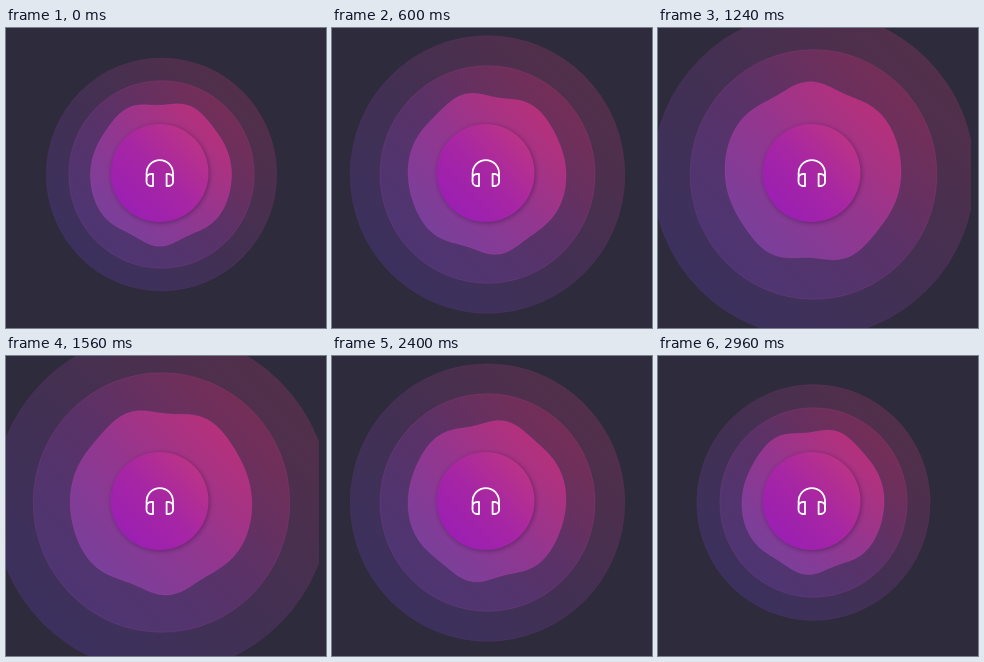
Recreate the animation shown at these times as an HTML page with a canvas. Size 320 by 300 pixels, loop 3 s.

```html
<!DOCTYPE html>
<html>
<head>
<meta charset="utf-8">
<style>
html, body { margin: 0; width: 100%; height: 100%; overflow: hidden; background: #2e2b3d; }
canvas { display: block; }
</style>
</head>
<body>
<canvas id="stage" width="320" height="300"></canvas>
<script>
const ctx = document.getElementById('stage').getContext('2d');
const LOOP = 3000, RIPPLE = 500, TAU = Math.PI * 2;
const cup = 'v12h-2a4.5 4.5 0 0 1-4.5-4.5v-3a4.5 4.5 0 0 1 4.5-4.5z';
const headphones = new Path2D(
  'M140.6 153V145.3a13.2 13.2 0 0 1 26.4 0V153M147 146' + cup);
const rightCup = new Path2D(
  'M160.6 146v12h2a4.5 4.5 0 0 0 4.5-4.5v-3a4.5 4.5 0 0 0-4.5-4.5z');

// Diagonal gradient from the lower left to the upper right of a disc.
function gradient(x, y, r, colors) {
  const d = r * 0.75;
  const g = ctx.createLinearGradient(x - d, y + d, x + d, y - d);
  colors.forEach((c, i) => g.addColorStop(i / (colors.length - 1), c));
  return g;
}

function ring(rx, ry, colors, edge) {
  ctx.beginPath();
  ctx.ellipse(155.5, 146.5, rx, ry, 0, 0, TAU);
  paint(gradient(155.5, 146.5, rx, colors), edge);
}

function paint(fill, edge) {
  ctx.fillStyle = fill;
  ctx.fill();
  ctx.strokeStyle = edge;
  ctx.lineWidth = 1;
  ctx.stroke();
}

// A disc whose upper and lower rims carry a ripple running to the right.
function blob(r, phase) {
  ctx.beginPath();
  for (let i = 0; i < 180; i++) {
    const a = i / 180 * TAU, c = Math.cos(a), s = Math.sin(a);
    const d = r * (1 + 0.038 * s * Math.cos(7 * c - phase));
    ctx.lineTo(155 + d * c, 145 + d * s);
  }
  ctx.closePath();
  paint(gradient(155, 145, r, ['#78409b', '#93368f', '#b7307a']), 'rgba(230,70,190,.16)');
}

function core() {
  ctx.save();
  ctx.shadowColor = 'rgba(60,15,70,.5)';
  ctx.shadowBlur = 5;
  ctx.shadowOffsetX = ctx.shadowOffsetY = 1;
  ctx.fillStyle = gradient(153.5, 145, 49, ['#9a1fb3', '#a726a4', '#bb3486']);
  ctx.beginPath();
  ctx.arc(153.5, 145, 49, 0, TAU);
  ctx.fill();
  ctx.restore();
  ctx.strokeStyle = '#fff';
  ctx.lineWidth = 1.8;
  ctx.lineJoin = 'round';
  ctx.stroke(headphones);
  ctx.stroke(rightCup);
}

function draw(now) {
  const t = now % LOOP;
  const grow = 1 - Math.abs(t / (LOOP / 2) - 1);
  const phase = t / RIPPLE * TAU - 0.2;
  ctx.clearRect(0, 0, 320, 300);

  ctx.save();
  ctx.beginPath();
  ctx.rect(0, 0, 313, 300);
  ctx.clip();
  const outer = 1 + 0.48 * grow, middle = 1 + 0.4 * grow;
  ring(115.3 * outer, 116.5 * outer, ['#3b315f', '#433052', '#532f4a'], 'rgba(200,70,160,.08)');
  ring(92.7 * middle, 93.8 * middle, ['#4d3673', '#593268', '#762e56'], 'rgba(220,70,180,.14)');
  blob(70.5 * (1 + 0.3 * grow), phase);
  ctx.restore();

  core();
}

const start = performance.now();
function tick() {
  draw(performance.now() - start);
  requestAnimationFrame(tick);
}
tick();
</script>
</body>
</html>
```
